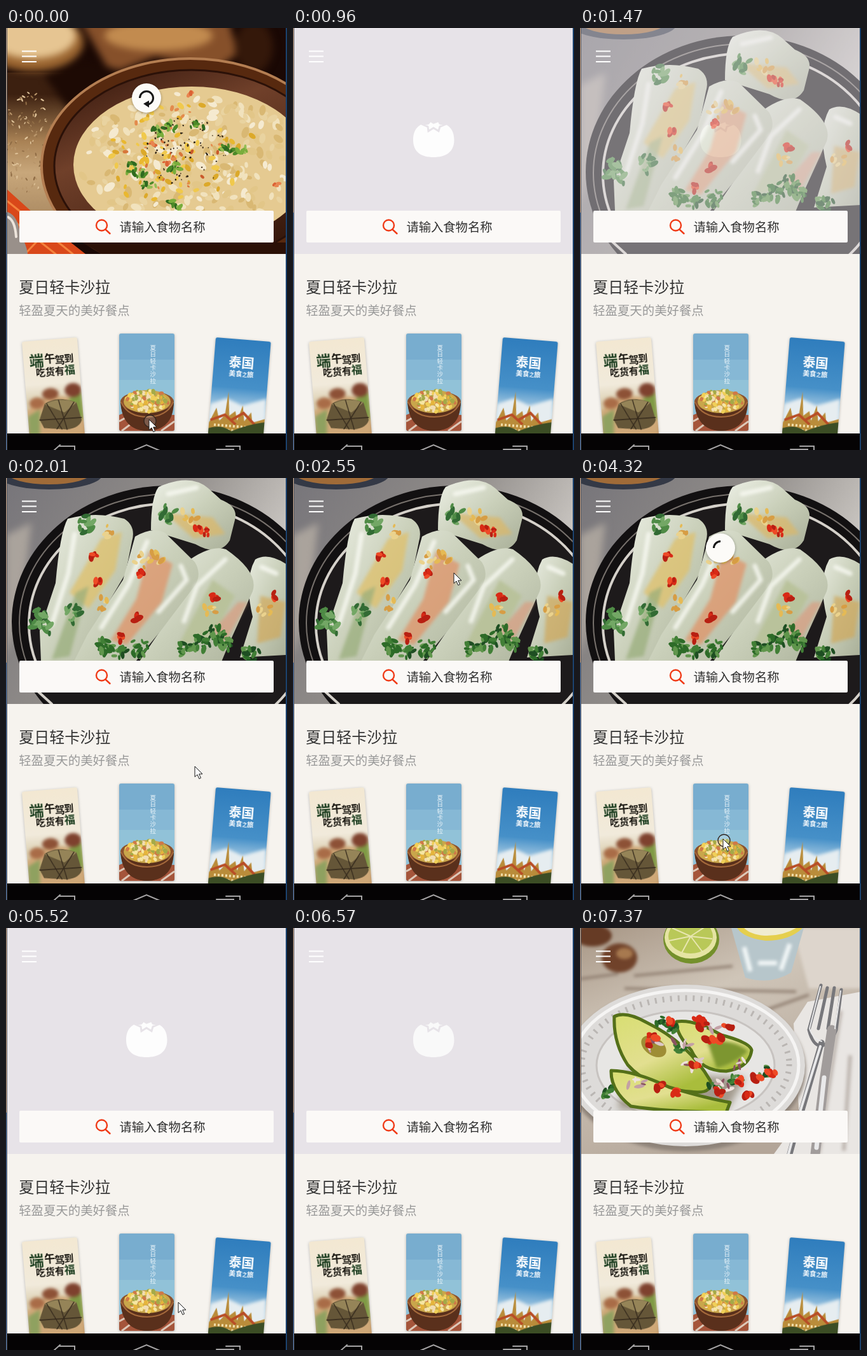
An HTML page for the animation above (8.89 s loop, 442x663 px).

```html
<!DOCTYPE html>
<html lang="zh">
<head>
<meta charset="utf-8">
<style>
html, body { margin: 0; width: 100%; height: 100%; overflow: hidden; background: #f6f3ee }
svg { display: block }
text { font-family: "Noto Sans CJK SC", "Noto Sans CJK", "Noto Sans", sans-serif }
.soft { filter: blur(6px) }
.haze { filter: blur(2.5px) }
.line { fill: none; stroke-linecap: round }
.card { filter: drop-shadow(0 1px 2px #0004) }
</style>
</head>
<body>
<svg id="stage" width="442" height="663" viewBox="0 0 442 663">
<defs>
  <linearGradient id="cloth" x2="0" y2="1"><stop offset=".12" stop-color="#3c2010"/><stop offset=".38" stop-color="#a98255"/><stop offset=".55" stop-color="#c8a77b"/><stop offset="1" stop-color="#94734e"/></linearGradient>
  <linearGradient id="wall" x2=".6" y2="1"><stop stop-color="#2f130a"/><stop offset=".4" stop-color="#70402a"/><stop offset="1" stop-color="#38190c"/></linearGradient>
  <linearGradient id="slate" x2="1" y2=".5"><stop stop-color="#77757a"/><stop offset=".5" stop-color="#8f8b88"/><stop offset="1" stop-color="#d9d5d0"/></linearGradient>
  <linearGradient id="wrap" x2="1" y2="1"><stop stop-color="#edf0e6"/><stop offset=".5" stop-color="#c9cfb9"/><stop offset="1" stop-color="#a9af98"/></linearGradient>
  <linearGradient id="table" x2=".5" y2="1"><stop stop-color="#a79685"/><stop offset=".4" stop-color="#cfc5b8"/><stop offset="1" stop-color="#b3a598"/></linearGradient>
  <linearGradient id="flesh" x2=".6" y2="1"><stop stop-color="#d8de72"/><stop offset=".6" stop-color="#e2df90"/><stop offset="1" stop-color="#a9bd3c"/></linearGradient>
  <linearGradient id="sky" x2="0" y2="1"><stop stop-color="#2f7dbd"/><stop offset=".5" stop-color="#4690c8"/><stop offset=".75" stop-color="#bcd7e8"/></linearGradient>
  <linearGradient id="cream" x2="0" y2="1"><stop stop-color="#f3e8d2"/><stop offset=".45" stop-color="#f1eadb"/><stop offset=".65" stop-color="#d9cdae"/><stop offset="1" stop-color="#b5895c"/></linearGradient>
  <clipPath id="cut"><rect width="87" height="153" rx="3"/></clipPath>
</defs>
<rect width="442" height="663" fill="#f6f3ee"/>

<svg x="2" width="438" height="355" viewBox="2 0 438 355">
  <rect width="442" height="355" fill="#e7e3e8"/>
  <g id="tomato" fill="#fdfdfd">
    <path d="M221 203C202 203 189 195 189 176C189 159 198 150 211 150L221 152L231 150C244 150 253.500 159 253.500 176C253.500 195 240 203 221 203Z"/>
    <path d="M205 152L213 150L216 146L221 149L229 146L231 150L238 152L231 155L229 162L221 157L213 162L212 155Z" stroke="#e7e3e8" stroke-width="3"/>
  </g>

  <g id="soup">
    <rect width="442" height="355" fill="#1a0804"/>
    <path d="M0 70L120 70L90 355H0Z" fill="url(#cloth)"/>
    <g class="soft">
      <ellipse cx="42" cy="22" rx="80" ry="46" fill="#9b6530"/><ellipse cx="42" cy="12" rx="68" ry="36" fill="#e6c592"/>
      <path d="M118 -10H350L365 40L330 65L235 45L165 72Z" fill="#86502a"/><ellipse cx="240" cy="12" rx="85" ry="24" fill="#c28b4f"/>
      <path d="M60 75L125 50L190 70L100 130Z" fill="#1d0a04"/><ellipse cx="390" cy="30" rx="30" ry="40" fill="#34180a"/>
    </g>
    <g id="weave"></g>
    <path d="M2 254L42 290L125 355H2Z" fill="#d9481a"/>
    <path class="line" d="M2 272L105 355M2 295L78 355M30 355L65 318" stroke="#f4823c" stroke-width="3"/>
    <path d="M0 288Q20 294 22 325Q32 338 34 355H0Z" fill="#99908a"/><path class="line" d="M3 297Q14 302 16 328" stroke="#eee5dc" stroke-width="4"/>
    <ellipse cx="290" cy="217" rx="234" ry="169" fill="#57290f" stroke="#b47e52" stroke-width="4"/>
    <ellipse cx="292" cy="217" rx="216" ry="151" fill="url(#wall)" stroke="#2b1108" stroke-width="3"/>
    <ellipse cx="292" cy="215" rx="186" ry="123" fill="#e5ca91"/>
    <g id="broth"></g>
    <path d="M120 337H442V355H150Z" fill="#2b1006"/>
  </g>

  <g id="rolls">
    <rect width="442" height="355" fill="url(#slate)"/>
    <path class="soft" d="M0 90L40 70L25 200L0 280Z" fill="#aaa39c"/>
    <ellipse cx="68" cy="-6" rx="84" ry="24" fill="#343946"/><ellipse cx="68" cy="-8" rx="66" ry="18" fill="#a06b38"/>
    <ellipse cx="256" cy="226" rx="247" ry="214" fill="#121011"/>
    <ellipse cx="257" cy="228" rx="236" ry="203" fill="none" stroke="#77716c" stroke-width="2"/>
    <ellipse cx="258" cy="230" rx="222" ry="190" fill="#1d1a1b" stroke="#d5d1ca" stroke-width="4"/>
    <g fill="url(#wrap)">
      <path d="M240 14Q290 -8 318 16L338 34Q366 45 360 66L352 98Q335 125 298 104L228 82Q228 30 240 14Z"/>
      <path d="M97 64Q140 52 186 64Q205 76 198 100L188 150L150 215L112 310H56L53 240L78 165Q85 85 97 64Z"/>
      <path d="M392 128Q412 116 442 136V278L368 282L388 218Q374 160 392 128Z"/>
      <path d="M280 135Q320 104 346 112Q398 148 388 178L350 262L330 310H195L248 232Z"/>
      <path d="M203 92Q230 76 250 86L297 132Q308 150 298 168L245 238L186 310H96L128 246L184 160Z"/>
    </g>
    <g class="haze">
      <path d="M150 95L182 85L172 145L130 205L100 180Z" fill="#dfc06b" opacity=".75"/>
      <path d="M110 180L130 170L100 280L72 285Z" fill="#98ad79" opacity=".7"/>
      <path d="M225 115L262 135L245 195L190 262L165 255L205 190Z" fill="#df9368" opacity=".75"/>
      <path d="M250 55L325 62L345 88L295 95Z" fill="#dcb766" opacity=".7"/>
      <path d="M325 160L360 185L325 250L270 265Z" fill="#b9c29b"/><path d="M365 195L380 195L345 258L325 240Z" fill="#da9d80" opacity=".7"/>
      <path d="M400 185L440 195L432 250L395 260Z" fill="#d0a95a" opacity=".7"/>
      <g fill="none" stroke="#f8faf2" stroke-width="7" stroke-linecap="round" opacity=".85"><path d="M108 88L98 150L72 230"/><path d="M222 100L192 168L150 235"/><path d="M255 25L300 15"/><path d="M345 128L300 170L280 225"/><path d="M402 140L425 150"/><path d="M275 138L284 160L240 210"/></g>
    </g>
    <g id="garnish"></g>
    <path d="M45 337H400L375 355H66Z" fill="#1b191a"/><path class="line" d="M50 335L72 355" stroke="#d5d1ca" stroke-width="4"/>
  </g>

  <g id="salad">
    <rect width="442" height="355" fill="url(#table)"/>
    <g class="haze">
      <path d="M85 75L240 60M70 95L340 100M0 80L60 72M290 130L360 105" stroke="#8f7e70" stroke-width="4"/>
      <ellipse cx="20" cy="12" rx="30" ry="17" fill="#663b25"/><ellipse cx="62" cy="47" rx="28" ry="23" fill="#70422a"/><ellipse cx="70" cy="40" rx="13" ry="9" fill="#a7794f"/>
      <path d="M335 0H442V95H360Z" fill="#ddd5cc"/>
    </g>
    <ellipse cx="175" cy="18" rx="44" ry="38" fill="#74902b"/><ellipse cx="174" cy="15" rx="41" ry="33" fill="#e5e4a3"/><ellipse cx="174" cy="13" rx="35" ry="27" fill="#b9c858"/>
    <path d="M174 13L145 0M174 13L140 20M174 13L160 39M174 13L193 38M174 13L208 17M174 13L200 -4" stroke="#e8e6b0" stroke-width="2"/>
    <path d="M238 0H352L332 70Q300 90 260 78Z" fill="#b7c6cb"/><path d="M247 0H350Q330 20 292 20Q258 16 247 0Z" fill="#e5cf4e"/><path d="M258 0H340Q318 13 290 12Q268 10 258 0Z" fill="#f0ecd0"/>
    <path class="haze" d="M258 30L268 68M330 25L316 66M280 55H310" stroke="#f3f8f8" stroke-width="7"/>
    <path d="M358 116L442 100V355H305L345 300L336 150Z" fill="#e9e6e3"/><path class="haze" d="M410 130L375 355M425 200L415 350" stroke="#bdb5af" stroke-width="6"/>
    <ellipse cx="166" cy="222" rx="189" ry="129" fill="#8e8379" class="haze"/>
    <ellipse cx="166" cy="216" rx="188" ry="127" fill="#dddbd9"/>
    <ellipse cx="166" cy="215" rx="178" ry="117" fill="none" stroke="#f5f4f3" stroke-width="5"/><ellipse cx="166" cy="214" rx="163" ry="104" fill="none" stroke="#bab6b3" stroke-width="9" stroke-dasharray="3 9"/>
    <ellipse cx="166" cy="216" rx="140" ry="86" fill="#e7e6e4" stroke="#c7c3c0" stroke-width="3"/>
    <path class="soft" d="M70 225L260 235L230 290L60 285Z" fill="#a29a8d"/>
    <g stroke="#547019" stroke-width="5" stroke-linejoin="round" fill="url(#flesh)">
      <path d="M54 139Q72 130 104 148Q170 180 205 240Q208 258 185 258Q110 255 75 215Q52 180 54 139Z"/>
      <path d="M152 147Q180 143 222 168Q268 180 270 192Q266 220 230 225Q190 225 175 192Q150 165 152 147Z"/>
      <path d="M49 224Q85 224 140 250Q200 268 236 274L230 290Q130 288 80 280Q48 255 49 224Z"/>
    </g>
    <path class="haze" d="M200 178Q245 175 264 194Q240 215 215 220Z" fill="#7d9630"/>
    <ellipse cx="116" cy="186" rx="22" ry="14" transform="rotate(35 116 186)" fill="#9e8d35"/>
    <g id="salsa"></g>
    <g class="line" stroke="#77777b"><path d="M379 90L360 160Q366 184 378 185Q394 184 403 160L411 97M389 94L375 158M400 94L390 158" stroke-width="5"/><path d="M380 180L345 300L330 355" stroke-width="9"/><path d="M396 160L384 240L370 355" stroke-width="15" stroke="#a19c9b"/></g>
    <g class="line" stroke="#e9e9ea"><path d="M378 92L361 158Q366 174 380 178M410 99L401 158" stroke-width="2"/><path d="M378 186L342 302L328 355" stroke-width="4"/><path d="M384 235L372 345" stroke-width="7"/></g>
  </g>
</svg>

<path d="M25 36.500H48M25 44.500H48M25 53H48" stroke="#fff" stroke-width="2"/>
<rect x="21" y="287" width="400" height="50" rx="2" fill="#fbf9f7"/>
<g class="line" stroke="#f03a17" stroke-width="2.400"><circle cx="150.500" cy="310" r="8.500"/><path d="M156.500 316.500L163.500 323"/></g>
<text x="178.500" y="320" font-size="19.300" fill="#2e2e2e">请输入食物名称</text>
<text x="20.300" y="415.500" font-size="24" fill="#333">夏日轻卡沙拉</text>
<text x="20.200" y="450.500" font-size="19.400" fill="#999">轻盈夏天的美好餐点</text>

<g class="card" transform="translate(25 493) rotate(-4.600)"><g clip-path="url(#cut)">
  <rect width="87" height="153" fill="url(#cream)"/>
  <g class="haze"><path d="M0 110Q30 75 87 100V153H0Z" fill="#cfa878"/><path d="M66 95L87 86V130L70 118Z" fill="#7f9a45"/><ellipse cx="38" cy="85" rx="13" ry="9" fill="#8d5136"/><ellipse cx="74" cy="82" rx="13" ry="11" fill="#7e412e"/><ellipse cx="16" cy="98" rx="12" ry="9" fill="#a96c47"/><path d="M0 118L20 108L16 153H0Z" fill="#8fa160"/></g>
  <path d="M18 124L28 100Q50 88 78 102L84 130Q80 142 60 143L24 138Z" fill="#655638"/><path d="M28 101Q50 90 78 102L58 116Z" fill="#958458"/><path class="line" d="M18 125L84 126M31 100L52 142M74 101L44 141M50 96L60 143" stroke="#33281b" stroke-width="1.300"/>
  <g fill="#17150f" font-weight="700"><text x="9" y="40" font-size="23" fill="#1f4022">端</text><text x="33" y="36" font-size="17">午</text><text x="49" y="39" font-size="16">驾</text><text x="64" y="37" font-size="15">到</text><text x="18" y="56" font-size="15">吃货有<tspan font-size="17" fill="#1f4022">福</tspan></text></g>
</g></g>

<g class="card" transform="translate(178 480)"><g clip-path="url(#cut)">
  <rect width="87" height="153" fill="#78adcf"/><rect y="41" width="87" height="32" fill="#86b8d5"/><rect y="73" width="87" height="80" fill="#91c2d8"/>
  <path d="M0 128L14 122L87 128V153H0Z" fill="#a5553b"/><path d="M0 138L18 128M4 153L24 138M66 153L87 138" stroke="#ddc8b8" stroke-width="3"/>
  <path d="M2 106Q6 152 44 153Q82 152 86 106Z" fill="#5a301c"/><ellipse cx="44" cy="107" rx="42" ry="17" fill="#8c512c"/><ellipse cx="44" cy="107" rx="37" ry="18" fill="#c9a64b"/>
  <g id="corn"></g><path d="M2 106Q12 130 44 130Q76 130 86 106Q86 152 44 153Q4 152 2 106Z" fill="#5a301c"/><path class="line" d="M3 108Q14 131 44 131Q75 131 85 108" stroke="#a66a3c" stroke-width="2"/>
  <g id="menu" fill="#eef6fa" font-size="9.500" font-weight="300"></g>
</g></g>

<g class="card" transform="translate(330 486) rotate(4.600)"><g clip-path="url(#cut)">
  <rect width="87" height="153" fill="url(#sky)"/>
  <path class="haze" d="M0 105L25 94L50 104L87 90V130H0Z" fill="#e6edf0"/>
  <path d="M0 134L10 110L16 130L24 121L27 83L31 121L40 113L44 128L51 103L55 128L65 113L68 129L87 122V153H0Z" fill="#b98c3a"/><path d="M2 130L24 120L42 134M34 128L53 115L72 132" stroke="#b84d26" stroke-width="4" fill="none"/>
  <path d="M8 137H72M6 144H76" stroke="#f1dda8" stroke-width="4" stroke-dasharray="3 3"/><path d="M0 143Q20 135 36 145Q62 132 87 127V153H0Z" fill="#3c4d25"/>
  <g fill="#fff" font-weight="900"><text x="23.500" y="44" font-size="20">泰国</text><text x="25" y="58" font-size="10.500">美食<tspan font-size="7.500">之</tspan>旅</text></g>
</g></g>

<rect x="2" y="637" width="438" height="26" fill="#050304"/>
<path class="line" d="M108 664V657H83M85 655L75 664M200 664L221 655L242 664M346 657H368V664M331 662H358V664" stroke="#a5a3a4" stroke-width="2"/>
<path d="M.5 0V290" stroke="#c4a084"/><path d="M.5 290V663" stroke="#446a9e"/><path d="M1.500 0V663" stroke="#565960"/>
<path d="M441 0V663" stroke="#1b416c" stroke-width="2"/>

<g id="badge">
  <circle r="23" fill="#fcfbf8" style="filter:drop-shadow(0 1px 2px #0005)"/>
  <g id="spin"><path id="arc" fill="none" stroke="#161616" stroke-width="3"/><path id="head" d="M-5 9L4 4V15Z" fill="#161616"/></g>
</g>
<g id="cursor">
  <circle id="press" cx="1.500" cy="2.500" r="9.500" fill="#fff3" stroke="#33261f" stroke-width="1.400"/>
  <path d="M0 0V16.500L4 13L6.800 19.500L9.500 18.300L6.700 12H12Z" fill="#fff" stroke="#181818"/>
</g>
</svg>
<script>
const $ = id => document.getElementById(id);
let seed = 11;
const rnd = () => (seed = seed * 16807 % 2147483647) / 2147483647;
const pick = list => list[Math.floor(rnd() * list.length)];

// Fills an ellipse with small random ovals.
function scatter(id, n, cx, cy, rx, ry, size, colors, flat = .6) {
  let out = '';
  for (let i = 0; i < n; i++) {
    const a = rnd() * 2 * Math.PI, r = Math.sqrt(rnd()), s = size * (.5 + rnd() * .6);
    const x = (cx + rx * r * Math.cos(a)).toFixed(1), y = (cy + ry * r * Math.sin(a)).toFixed(1);
    out += `<ellipse cx="${x}" cy="${y}" rx="${s}" ry="${s * flat}" fill="${pick(colors)}" transform="rotate(${Math.round(rnd() * 180)} ${x} ${y})"/>`;
  }
  $(id).insertAdjacentHTML('beforeend', out);
}
const spots = (id, places, n, rx, ry, size, colors, flat) =>
  places.forEach(([x, y]) => scatter(id, n, x, y, rx, ry, size, colors, flat));

const greens = ['#4c8a28', '#79ad3c', '#2f6a20', '#96bd55'];
const darkGreens = ['#2d6b28', '#417f36', '#1e4e22', '#60964c'];
const reds = ['#d92a16', '#ee4a26', '#b81f12'];

scatter('weave', 130, 35, 180, 40, 82, 3, ['#dfc39a', '#8f6c45', '#b8956a'], .4);
scatter('broth', 330, 292, 215, 176, 113, 9, ['#f1e2bd', '#e2c688', '#d9b873', '#f5ead0', '#e9d3a0']);
scatter('broth', 75, 280, 205, 120, 90, 6, ['#e9b830', '#f0c94c', '#dca92a']);
scatter('broth', 28, 265, 190, 80, 65, 4.5, ['#d8763a', '#e38b4d', '#ca5a2b']);
spots('broth', [[196, 220], [212, 228], [238, 164], [258, 155], [300, 155], [348, 190], [368, 192], [266, 218], [264, 279], [225, 246]], 9, 11, 8, 6, greens, .5);
scatter('broth', 75, 285, 195, 65, 55, 1.7, ['#2b2116', '#4a3822'], .8);
spots('broth', [[425, 246], [232, 183], [251, 212], [292, 103]], 3, 6, 3, 5, ['#dc6234', '#e88550']);

spots('garnish', [[125, 74], [255, 56], [62, 230], [50, 222], [105, 215]], 12, 12, 17, 8, ['#4f8b46', '#73a765', '#326b34'], .5);
spots('garnish', [[152, 264], [175, 272], [208, 266], [282, 268], [310, 258], [328, 244], [344, 258], [385, 276]], 15, 15, 13, 7, darkGreens, .5);
spots('garnish', [[160, 82], [150, 195], [215, 130], [240, 122], [288, 60], [322, 205], [408, 205]], 7, 13, 13, 6, ['#e5ba55', '#d79d44', '#ead28d']);
spots('garnish', [[137, 122], [143, 162], [214, 152], [205, 219], [180, 251], [302, 78], [315, 86], [328, 187], [420, 186]], 5, 6, 6, 7, reds);

spots('salsa', [[130, 148], [145, 155], [160, 188], [210, 252], [245, 240], [290, 225], [42, 257]], 7, 10, 9, 7, darkGreens, .5);
spots('salsa', [[118, 184], [160, 178], [205, 155], [180, 212], [255, 215], [92, 247], [225, 250]], 6, 16, 10, 8, ['#c3a0a5', '#eee1dc', '#8a5362', '#dcc8c7'], .35);
spots('salsa', [[144, 148], [187, 141], [193, 153], [234, 156], [200, 174], [215, 174], [113, 172], [108, 183], [180, 214], [122, 248], [148, 259], [220, 256], [255, 243], [264, 262], [276, 237], [302, 228]], 4, 8, 5, 7.5, reds, .7);
scatter('corn', 110, 44, 106, 33, 17, 4, ['#f0cf58', '#e5b43c', '#f6e6a2', '#cf7947', '#a4aa48', '#f1dcb2'], .75);

$('menu').innerHTML = [...'夏日轻卡沙拉'].map((c, i) => `<text x="48.500" y="${26 + i * 10.3}">${c}</text>`).join('');

const LOOP = 8890, STEP = 134, LAST = 55;

// Linear interpolation through [step, value] pairs.
function along(keys, k) {
  const i = keys.findIndex(p => p[0] >= k);
  if (i < 0) return keys[keys.length - 1][1];
  if (!i) return keys[0][1];
  const [a, u] = keys[i - 1], [b, v] = keys[i];
  return u + (v - u) * (k - a) / (b - a);
}
const cursorX = [[1, 225], [4, 446], [13, 446], [15, 297], [19, 253], [23, 225], [36, 225], [40, 271], [41, 271], [47, 446]];
const cursorY = [[1, 615], [4, 628], [13, 490], [15, 453], [19, 149], [23, 140], [25, 150], [32, 567], [34, 586], [36, 586], [40, 588], [41, 588], [44, 630], [47, 631]];
const badgeY = [[24, -28], [30, 110]];
const badgeSize = [[1, 1], [3, 0], [23, 0], [24, 1], [35, 1], [37, 0]];
const sweepKeys = [[30, 0], [32, 90], [34, 275]];

function draw(k) {
  const sweep = k < 24 ? 275 : along(sweepKeys, k), end = Math.PI * (1 + sweep / 180);
  $('soup').style.opacity = k < 3 ? 1 : 0;
  $('rolls').style.opacity = k < 37 ? along([[8, 0], [11, .55], [14, 1]], k) : 0;
  $('salad').style.opacity = along([[50, 0], [54, 1]], k);
  $('tomato').style.opacity = k == 49 || k == 50 ? .85 : 1;
  $('badge').setAttribute('transform', `translate(221 ${k < 24 ? 110 : along(badgeY, k)}) scale(${along(badgeSize, k)})`);
  $('spin').setAttribute('transform', `rotate(${along([[0, 0], [3, 180], [24, 0], [34, 0], [37, 180]], k)})`);
  $('arc').setAttribute('d', `M-10.500 0A10.500 10.500 0 ${sweep > 180 ? 1 : 0} 1 ${10.5 * Math.cos(end)} ${10.5 * Math.sin(end)}`);
  $('head').style.opacity = sweep > 250 ? 1 : 0;
  $('cursor').setAttribute('transform', `translate(${along(cursorX, k)} ${along(cursorY, k)})`);
  $('press').style.opacity = k < 1 || k > 23 && k < 35 ? 1 : 0;
}

let shown = -1;
function tick() {
  const k = Math.min(LAST, Math.floor((performance.now() % LOOP + 10) / STEP));
  if (k != shown) draw(shown = k);
  requestAnimationFrame(tick);
}
tick();
</script>
</body>
</html>
```
